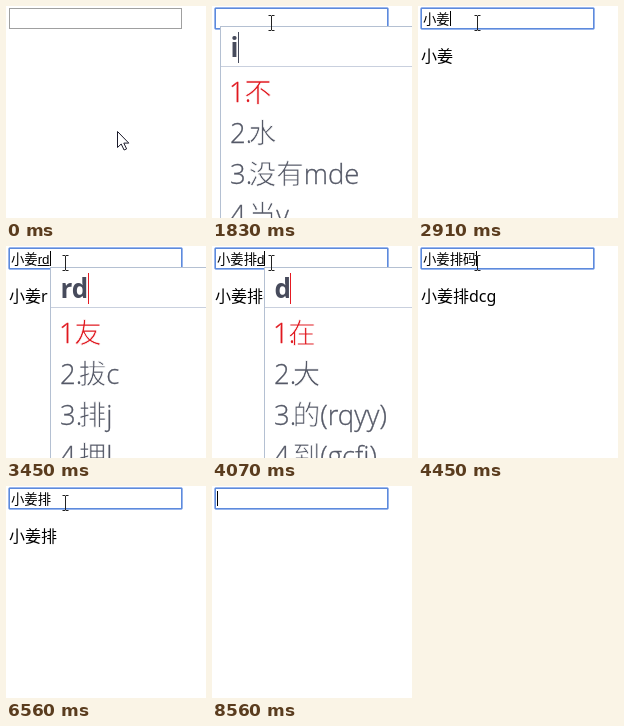
Recreate the animation shown at these times as an HTML page. Size 200 px wide and 212 px high, loop 8960 ms.

```html
<!DOCTYPE html>
<html lang="zh">
<head>
<meta charset="utf-8">
<title>Input method typing</title>
<style>
  html, body { margin: 0; width: 200px; height: 212px; overflow: hidden; background: #fff; }
  svg { display: block; }
  .field { font: 13.333px "Liberation Sans", "Noto Sans CJK SC", "Noto Sans CJK", sans-serif; }
  #echo { font: 16px "Noto Sans", "Noto Sans CJK SC", "Noto Sans CJK", sans-serif; }
  #typed { font: 700 26px "Open Sans", sans-serif; fill: #474b5c; }
  .row {
    font: 300 27.5px "Open Sans", "Noto Sans CJK SC", "Noto Sans CJK", sans-serif;
    fill: #555967; stroke: #555967; stroke-width: .3;
  }
  .row.first { fill: #e0181f; stroke: #e0181f; }
  /* a white edge thins the Han strokes to a light weight */
  .han { stroke: #fff; stroke-width: .75; }
</style>
</head>
<body>
<svg width="200" height="212" viewBox="0 0 200 212">
  <rect id="ring" x="2.5" y="1.5" width="174" height="22" rx="1.5" fill="none" stroke="#98b5ec"/>
  <rect id="box" x="3.5" y="2.5" width="172" height="20" fill="#fff"/>
  <text id="text" class="field" x="5" y="18"></text>
  <text id="code" class="field" y="18"></text>
  <rect id="under" y="19" height="1"/>
  <rect id="caret" y="5" width="1" height="15"/>
  <text id="echo" x="3" y="56"></text>
  <g id="popup">
    <rect x=".5" y=".5" width="260" height="230" fill="#fff" stroke="#b4c0d2"/>
    <path d="M1 40.5H260" stroke="#c9d0de"/>
    <text id="typed" x="10.4" y="30.5"></text>
    <rect id="bar" y="6" width="1" height="31"/>
    <g id="rows"></g>
  </g>
  <path id="beam" d="M56.5 9.5h2.5l.5 .5 .5-.5h2.5M59.5 10v14M56.5 24.5h2.5l.5-.5 .5 .5h2.5" fill="none" stroke="#222"/>
  <path id="arrow" d="M.5 .5v16l3.7-3.5 2.9 6 2.5-1.1-2.8-5.8h5z" fill="#fff" stroke="#1a1a2a"/>
</svg>
<script>
const LOOP = 8960, EM = 13.333;
const $ = id => document.getElementById(id);
const show = (el, on) => el.setAttribute('display', on ? 'inline' : 'none');
const set = (el, attrs) => { for (const k in attrs) el.setAttribute(k, attrs[k]); };

// time, committed text, code being typed, echoed paragraph, caret visible
const steps = [
  [0, '', '', '', 0],
  [740, '', '', '', 1],
  [1280, '', '', '', 0],
  [1830, '', 'i', '', 0],
  [1910, '', 'i', 'i', 1],
  [1990, '', 'ih', 'ih', 1],
  [2080, '小', '', '小', 1],
  [2360, '小', 'u', '小', 1],
  [2440, '小', 'ug', '小u', 1],
  [2530, '小', 'ugv', '小ug', 1],
  [2680, '小姜', '', '小ug', 1],
  [2760, '小姜', '', '小ugv', 1],
  [2910, '小姜', '', '小姜', 1],
  [3370, '小姜', 'r', '小姜', 1],
  [3450, '小姜', 'rd', '小姜r', 1],
  [3680, '小姜', 'rdj', '小姜rd', 1],
  [3760, '小姜排', '', '小姜排', 1],
  [3990, '小姜排', 'd', '小姜排', 1],
  [4070, '小姜排', 'd', '小姜排d', 1],
  [4220, '小姜排', 'dc', '小姜排d', 1],
  [4370, '小姜排', 'dcg', '小姜排dc', 1],
  [4450, '小姜排码', '', '小姜排dcg', 1],
  [4600, '小姜排码', '', '小姜排码', 1],
  [4770, '小姜排码', 'g', '小姜排码', 1],
  [4920, '小姜排码', 'gk', '小姜排码g', 1],
  [5000, '小姜排码事', '', '小姜排码事', 1],
  [5530, '小姜排码事', '', '小姜排码事', 0],
  [6080, '小姜排码', '', '小姜排码', 1],
  [6560, '小姜排', '', '小姜排', 0],
  [6770, '小姜', '', '小姜排', 1],
  [6870, '小姜', '', '小姜', 1],
  [7090, '小', '', '小姜', 1],
  [7190, '小', '', '小', 1],
  [7490, '', '', '小', 1],
  [7570, '', '', '', 1],
  [8030, '', '', '', 0],
  [8560, '', '', '', 1]
];

const candidates = {
  i: '不 水 没有mde 当v', ih: '小 小时jf 小心ny 少t',
  u: '产 立 并a 关d', ug: '羊 半 着h 美d', ugv: '姜 姜汤in 羞f 妾f',
  r: '的 找a 后g 年h', rd: '友 拔c 排j 押l', rdj: '排 排队bw 排列gq 排名qk',
  d: '在 大 的(rqyy) 到(gcfj)', dc: '左 码g 戏a 友', dcg: '码 码头ud 号码dc 研',
  g: '一 与 不(gii) 来o', gk: '事 整个wh 事情ng 带来go'
};

const add = (parent, tag, attrs, text = '') => {
  const el = parent.appendChild(document.createElementNS('http://www.w3.org/2000/svg', tag));
  set(el, attrs);
  el.textContent = text;
  return el;
};

const rows = [0, 1, 2, 3].map(i => {
  const look = { class: i ? 'row' : 'row first', y: 76 + 41 * i };
  add($('rows'), 'text', { ...look, x: i ? 10 : 9 }, i + 1 + '.');
  const word = add($('rows'), 'text', { ...look, x: i ? 28.7 : 24.3 });
  return { han: add(word, 'tspan', { class: 'han' }), hint: add(word, 'tspan', {}) };
});

function render([, text, code, echo, caret]) {
  const end = 5 + EM * text.length;
  $('text').textContent = text;
  $('echo').textContent = echo;

  $('code').textContent = code;
  set($('code'), { x: end });
  const width = code ? $('code').getComputedTextLength() : 0;
  set($('under'), { x: end, width });
  set($('caret'), { x: Math.round(end + width) });
  show($('caret'), caret);
  // the popup opens before the first letter reaches the empty field
  const late = code && !caret;
  $('code').style.visibility = $('under').style.visibility = late ? 'hidden' : 'visible';

  show($('popup'), code);
  if (!code) return;
  set($('popup'), { transform: `translate(${Math.round(end + width)} ${text ? 21 : 20})` });
  $('typed').textContent = code;
  set($('bar'), {
    x: Math.round(9.9 + $('typed').getComputedTextLength()),
    fill: text ? '#e51a22' : '#474b5c'
  });
  candidates[code].split(' ').forEach((word, i) => {
    const [, han, hint] = word.match(/^([^a-z(]+)(.*)$/);
    rows[i].han.textContent = han;
    rows[i].hint.textContent = hint;
  });
}

function pointer(t) {
  const moved = t < 70 ? 0 : Math.min(7, 1 + Math.floor((t - 70) / 73.3));
  const k = (1 - Math.cos(Math.PI * moved / 7)) / 2;
  set($('arrow'), { transform: `translate(${Math.round(111 - 52 * k)} ${Math.round(125 - 108 * k)})` });
  show($('arrow'), moved < 7);
  show($('beam'), moved === 7 && t < 8100);
  set($('beam'), { transform: t < 970 ? 'translate(1 2)' : '' });
}

let last = null;
function frame() {
  const t = performance.now() % LOOP;
  const step = steps.findLast(s => s[0] <= t);
  if (step !== last) render(last = step);
  pointer(t);
  show($('ring'), t >= 740);
  set($('box'), { stroke: t >= 740 ? '#5d8adc' : '#a0a0a0' });
  requestAnimationFrame(frame);
}
frame();
</script>
</body>
</html>
```
